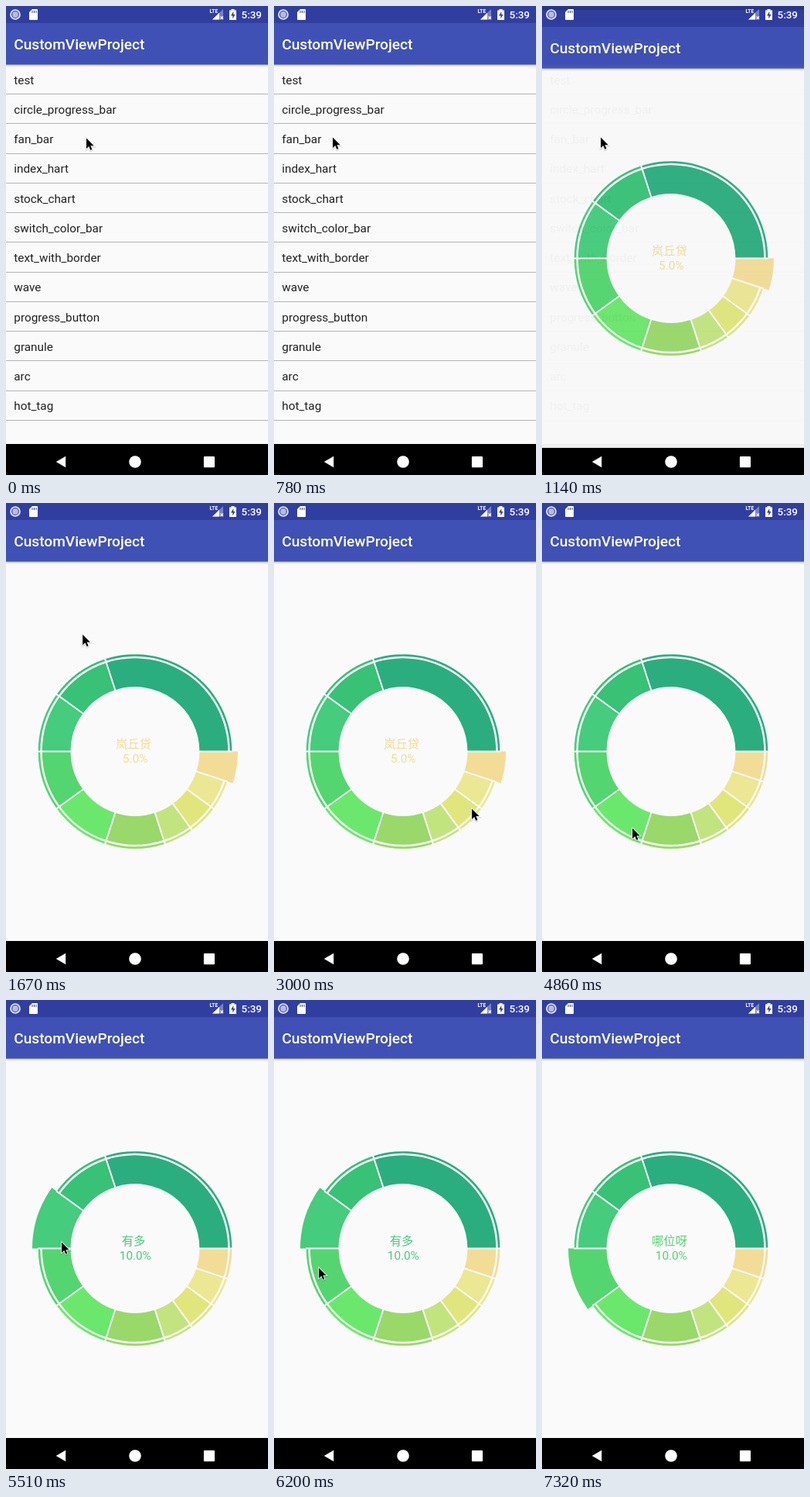
Write an HTML page that moves like this. It is 339 px wide and 605 px high and loops after 7.76 s.

```html
<!DOCTYPE html>
<html lang="en">
<head>
<meta charset="utf-8">
<title>CustomViewProject</title>
<style>
  html, body { margin: 0; width: 100%; height: 100%; overflow: hidden; background: #000; }
  svg { display: block; width: 339px; height: 605px; font-family: Roboto, sans-serif; }
  .title { font-size: 19.1px; font-weight: 500; fill: #fff; }
  .item { font-size: 15.3px; fill: #212121; }
  .label { font: 15.3px "Noto Sans CJK SC", "Noto Sans CJK", sans-serif; text-anchor: middle; }
  .percent { font-size: 15.3px; text-anchor: middle; }
</style>
</head>
<body>
<svg viewBox="0 0 339 605">
  <defs>
    <linearGradient id="shade" x2="0" y2="1">
      <stop stop-opacity=".3"/><stop offset=".4" stop-opacity=".1"/><stop offset="1" stop-opacity="0"/>
    </linearGradient>
    <path id="arrow" d="M1 1.500V15L4.200 12L6.300 16.800L8.400 15.900L6.400 11.200H10.700Z"/>
    <g id="frame">
      <rect width="339" height="565" fill="#fafafa"/>
      <rect width="339" height="22" fill="#303f9f"/>
      <rect y="22" width="339" height="53.600" fill="#3f51b5"/>
      <rect y="75.600" width="339" height="3.400" fill="url(#shade)"/>
      <text class="title" x="10.300" y="56">CustomViewProject</text>
    </g>
  </defs>
  <rect width="339" height="605"/>
  <g>
    <use href="#frame"/>
    <g id="rows"></g>
    <rect id="dim" width="339" height="565"/>
  </g>
  <g id="chartPage">
    <use href="#frame"/>
    <g id="chart">
      <g id="sectors"></g>
      <g id="dividers" stroke="#fafafa" stroke-width="2"></g>
    </g>
    <text id="label" class="label" x="165" y="316"></text>
    <text id="percent" class="percent" x="167.300" y="334.500"></text>
  </g>
  <g fill="#fff">
    <circle cx="12" cy="11" r="5.900" fill="none" stroke="#e4e7f6" stroke-width="1.900"/>
    <circle cx="12" cy="11" r="3.900" fill="#b4bbe4"/>
    <path d="M34 4h6q1 0 1 1v12q0 1-1 1h-9q-1 0-1-1V8z"/>
    <path d="M34 6v3M36.500 6v3M39 6v3" stroke="#303f9f"/>
    <text x="263.500" y="9.300" font-size="6.500" font-weight="700">LTE</text>
    <path d="M267 17.500L281 4v13.500z" opacity=".35"/>
    <path d="M267 17.500L276 8.800v8.700z"/>
    <path d="M277.500 13.500l3.500 3.500m0-3.500l-3.500 3.500" stroke="#fff" stroke-width="1.100"/>
    <path d="M291.500 4h4v1.500h2.500v12.500h-9V5.500h2.500z"/>
    <path d="M294.300 7l-3.300 5.500h2.300V16.500l3.200-5.500h-2.200z" fill="#303f9f"/>
    <text x="304.600" y="16" font-size="13.400" font-weight="500">5:39</text>
    <path d="M64.800 588l12.400-7.300v14.600z"/>
    <circle cx="167" cy="588" r="7.800"/>
    <rect x="255.900" y="581" width="14.100" height="14.300" rx="1"/>
  </g>
  <g id="cursor">
    <use href="#arrow" y="1" stroke="#000" stroke-width="2.600" opacity=".12"/>
    <use href="#arrow" stroke="#fff" stroke-width="1.600"/>
    <use href="#arrow"/>
  </g>
</svg>
<script>
const LOOP = 7760;
const CENTER = [167, 320.5];
const NS = "http://www.w3.org/2000/svg";
const el = id => document.getElementById(id);

function set(node, attrs) {
  for (const key in attrs) node.setAttribute(key, attrs[key]);
  return node;
}

function add(parent, tag, attrs, text = "") {
  const node = set(document.createElementNS(NS, tag), attrs);
  node.textContent = text;
  return parent.appendChild(node);
}

const items = ["test", "circle_progress_bar", "fan_bar", "index_hart", "stock_chart", "switch_color_bar",
  "text_with_border", "wave", "progress_button", "granule", "arc", "hot_tag"];
items.forEach((name, i) => {
  const y = 38.25 * i;
  add(el("rows"), "text", { class: "item", x: 10.3, y: Math.floor(101 + y) }, name);
  add(el("rows"), "rect", { y: Math.round(113 + y), width: 339, height: 1, fill: "#b4b4b4" });
});

// label, percentage, colour; clockwise from the right
const shares = [
  ["岚丘贷", 5, "#f3dc96"], ["云朵袋", 5, "#ece792"], ["松果仓", 5, "#e0e67b"], ["小溪流", 5, "#c2e47f"],
  ["大麦田", 10, "#98d96a"], ["蓝风车", 10, "#6ae86c"], ["哪位呀", 10, "#53d66f"], ["有多", 10, "#45cc7c"],
  ["竹叶青", 10, "#37c276"], ["石头记", 30, "#2aae7f"]
];

const polar = (r, a) => `${(r * Math.cos(a)).toFixed(2)} ${(r * Math.sin(a)).toFixed(2)}`;
const band = (r0, r1, a, b) =>
  `M${polar(r0, a)}L${polar(r1, a)}A${r1} ${r1} 0 0 1 ${polar(r1, b)}` +
  `L${polar(r0, b)}A${r0} ${r0} 0 0 0 ${polar(r0, a)}Z`;

set(el("chart"), { transform: `translate(${CENTER})` });
let angle = 0;
const sectors = shares.map(([, percent, fill]) => {
  const start = angle;
  const end = angle += percent / 50 * Math.PI;
  add(el("dividers"), "path", { d: `M${polar(82, start)}L${polar(126, start)}` });
  return {
    end,
    node: add(el("sectors"), "path", { fill }),
    rest: band(83.4, 120.2, start, end) + band(122.7, 125.3, start, end),
    open: band(83.4, 133, start, end)
  };
});

// pointer strokes: start, end, x, y reached
const strokes = [
  [600, 780, 75, 168],
  [1610, 1670, 98, 168],
  [1670, 2420, 238, 348],
  [2830, 3000, 255, 393],
  [3000, 3230, 249, 372],
  [3410, 3630, 222, 411],
  [3760, 4050, 180, 424],
  [4350, 4800, 116, 418],
  [5110, 5330, 71, 311],
  [5640, 6200, 57, 344],
  [6850, 7020, 197, 561],
  [7150, 7320, 345, 620]
];
const clicks = [3410, 3810, 4230, 4980, 5510, 6310];
const closed = t => t >= 4860 && t < 4980;

const clamp = v => Math.min(1, Math.max(0, v));

function cursorAt(t) {
  let x = 103, y = 169;
  for (const [start, end, toX, toY] of strokes) {
    const p = clamp((t - start) / (end - start));
    x += (toX - x) * p;
    y += (toY - y) * p;
  }
  return [x, y];
}

function sectorAt([x, y]) {
  const turn = 2 * Math.PI;
  const a = (Math.atan2(y - CENTER[1], x - CENTER[0]) + turn) % turn;
  return sectors.findIndex(s => a < s.end);
}

// each click opens the sector under the pointer
function selectedAt(t) {
  if (closed(t)) return -1;
  const click = clicks.filter(c => c <= t).pop();
  return click ? sectorAt(cursorAt(click)) : 0;
}

function openPage(t) {
  const elapsed = t - 1011;
  const fade = t < 1080 ? 0 : 1 - (1 - clamp(elapsed / 200)) ** 3;
  const offset = Math.round(48 * (1 - clamp(elapsed / 350)) ** 5);
  set(el("chartPage"), { opacity: fade, transform: `translate(0 ${offset})` });
  set(el("dim"), { opacity: 0.18 * fade });
}

function render(t) {
  openPage(t);
  const selected = selectedAt(t);
  sectors.forEach((s, i) => set(s.node, { d: i === selected ? s.open : s.rest }));
  const [name, percent, fill] = shares[selected] || ["", 0, "none"];
  set(el("label"), { fill }).textContent = name;
  set(el("percent"), { fill }).textContent = name && percent.toFixed(1) + "%";
  set(el("cursor"), { transform: `translate(${cursorAt(t)})` });
}

function tick() {
  render(performance.now() % LOOP);
  requestAnimationFrame(tick);
}
tick();
</script>
</body>
</html>
```
